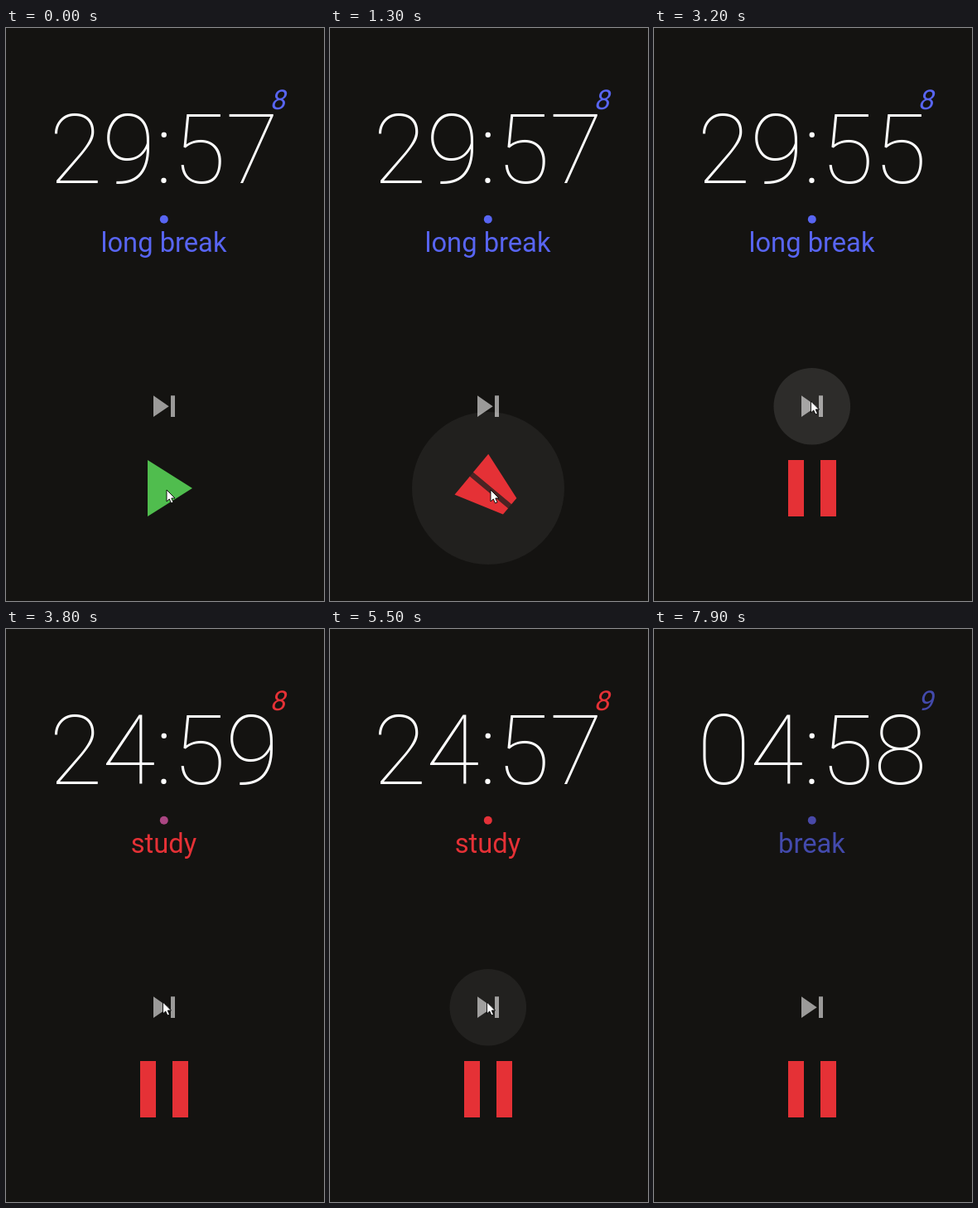
Write an HTML page that moves like this. It is 384x691 px and loops after 8000 ms.

```html
<!DOCTYPE html>
<html lang="en">
<head>
<meta charset="utf-8">
<title>Study timer</title>
<style>
  html, body { margin: 0; height: 100%; overflow: hidden; background: #141311; }
  svg { display: block; width: 100%; height: 100%; font-family: Roboto, sans-serif; }
  text { text-anchor: middle; }
</style>
</head>
<body>
<svg viewBox="0 0 384 691">
  <text id="clock" x="190.8" y="186.8" font-size="117" font-weight="100" fill="#fff"></text>
  <text id="count" transform="translate(327.7 97.5) skewX(-14)" font-size="33"></text>
  <circle id="dot" cx="190.8" cy="230.7" r="5"/>
  <text id="label" x="190.5" y="270" font-size="32.7"></text>
  <path d="M178 443.3L196.7 456.2 178 469zM199 443.3h5V469h-5z" fill="#9b9a99"/>
  <circle id="playGlow" cx="191" cy="555" r="92" fill="#fff"/>
  <circle id="splash" cx="191" cy="555" fill="#fff"/>
  <circle id="skipGlow" cx="190.8" cy="456.2" r="46.3" fill="#fff"/>
  <g id="button">
    <path id="gap"/>
    <path id="bars"/>
  </g>
  <path id="cursor" d="M0 0V14L3.2 11 5.5 16 8 15 5.8 10H10z" fill="#fff" stroke="#000" stroke-width=".9"/>
</svg>
<script>
const LOOP = 8000;
const BLUE = [88, 101, 242], RED = [229, 49, 54], GREEN = [80, 189, 78], DIM_BLUE = [67, 74, 172];
const START = 1080, STUDY = 3400, BREAK = 6400;

const el = Object.fromEntries([...document.querySelectorAll('[id]')].map(e => [e.id, e]));
const set = (e, attrs) => { for (const k in attrs) e.setAttribute(k, attrs[k]); };
const clamp = x => Math.min(1, Math.max(0, x));
const lerp = (a, b, p) => a + (b - a) * p;
const span = (t, a, b) => clamp((t - a) / (b - a));
const smooth = p => p * p * (3 - 2 * p);
const rgb = c => `rgb(${c.map(Math.round)})`;
const mix = (a, b, p) => rgb(a.map((v, i) => lerp(v, b[i], p)));
const bump = (t, start, peak, end) => span(t, start, peak) * (1 - span(t, peak, end));

// Seconds tick at 1400, 2400, ... ms
function clockText(t) {
  const ticks = Math.floor((t - 400) / 1000);
  const left = t < STUDY ? 29 * 60 + 57 - Math.max(0, ticks)
    : t < BREAK ? 25 * 60 + 2 - ticks
    : 5 * 60 + 5 - ticks;
  const pad = n => String(n).padStart(2, '0');
  return pad(Math.floor(left / 60)) + ':' + pad(left % 60);
}

function phaseColor(t, tau) {
  const fade = since => 1 - Math.exp((since - t) / tau);
  if (t < STUDY) return rgb(BLUE);
  return t < BREAK ? mix(BLUE, RED, fade(STUDY)) : mix(RED, DIM_BLUE, fade(BREAK));
}

// Two halves of the triangle turn into two bars
function drawButton(t) {
  const p = span(t, START, START + 500);
  const inner = 10 * p ** 1.4, outer = lerp(34, 29, p), tip = 29 * p, back = lerp(-20, -34, p);
  const half = s => `M${back} ${s * outer}L34 ${s * tip} 34 ${s * inner} ${back} ${s * inner}z`;
  const fill = rgb(t < START ? GREEN : RED);
  set(el.bars, { d: half(-1) + half(1), fill });
  set(el.gap, {
    d: `M${back} ${-inner}H34V${inner}H${back}z`, fill,
    opacity: 0.5 * clamp(1 - p * 1.3)
  });
  set(el.button, { transform: `translate(191 555) rotate(${90 * p})` });
}

function drawCursor(t) {
  const toSkip = smooth(span(t, 2100, 2700)), leave = smooth(span(t, 7300, 7900));
  const x = lerp(194, 189.5, toSkip) + 24 * leave;
  const y = lerp(557, 450, toSkip) - 472 * leave;
  set(el.cursor, { transform: `translate(${x} ${y})` });
}

function draw(t) {
  const color = phaseColor(t, 60);
  el.clock.textContent = clockText(t);
  el.label.textContent = t < STUDY ? 'long break' : t < BREAK ? 'study' : 'break';
  el.count.textContent = t < BREAK ? '8' : '9';
  set(el.label, { fill: color });
  set(el.count, { fill: color });
  set(el.dot, { fill: phaseColor(t, 450) });
  set(el.playGlow, { opacity: 0.07 * bump(t, 1000, 1200, 1700) });
  set(el.splash, { r: lerp(20, 75, span(t, 1000, 1250)), opacity: 0.05 * bump(t, 1000, 1080, 1290) });
  set(el.skipGlow, { opacity: 0.106 * (bump(t, 2900, 3200, 3750) + bump(t, 5330, 5630, 6150)) });
  drawButton(t);
  drawCursor(t);
}

const begin = performance.now();
function frame() {
  draw((performance.now() - begin) % LOOP);
  requestAnimationFrame(frame);
}
frame();
</script>
</body>
</html>
```
